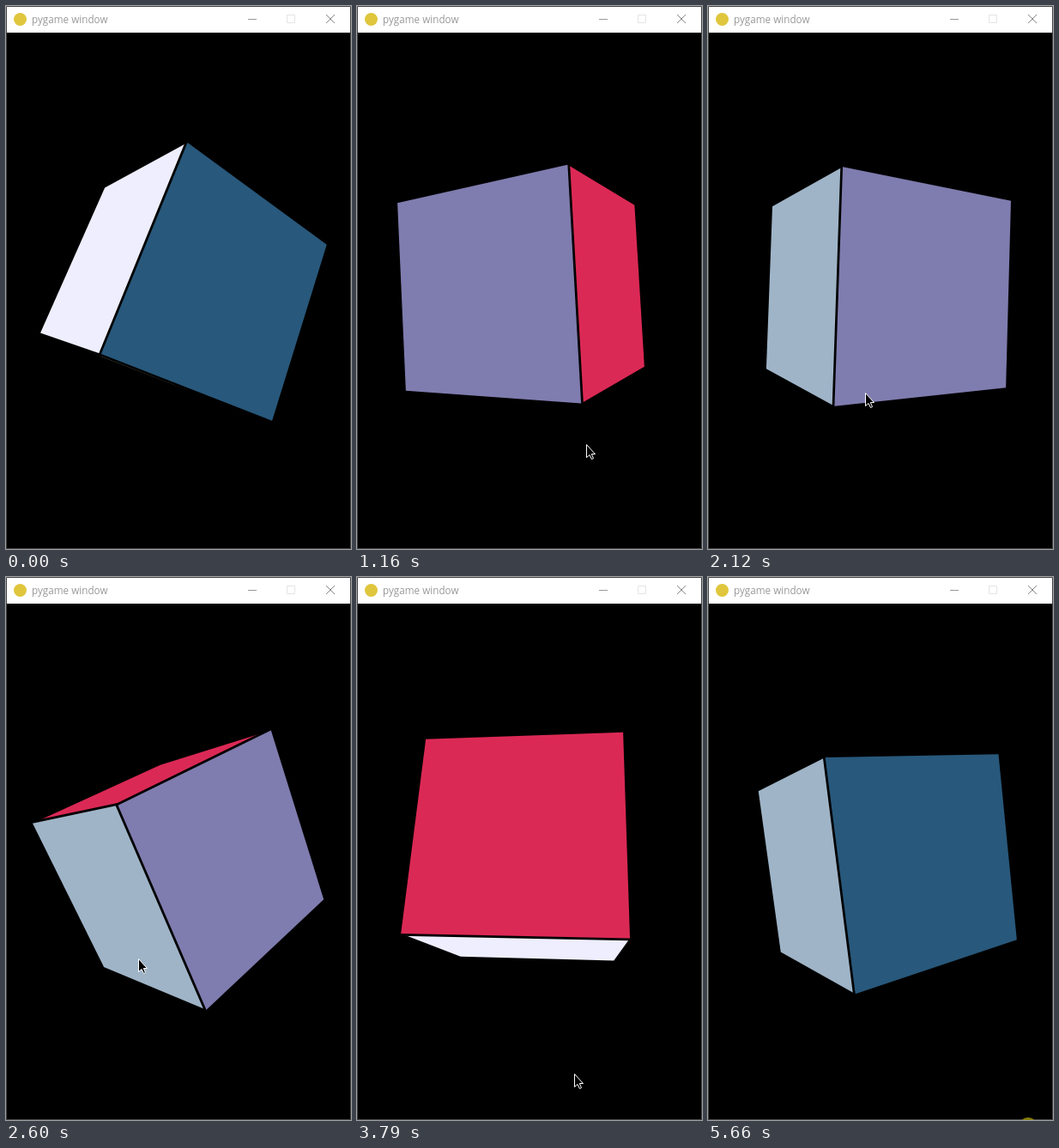
Recreate the animation shown at these times as an HTML page with a canvas. Size 402 by 632 pixels, loop 5.83 s.

```html
<!DOCTYPE html>
<html lang="en">
<head>
<meta charset="utf-8">
<title>pygame window</title>
<style>
  html, body { margin: 0; width: 100%; height: 100%; overflow: hidden; background: #000; }
  canvas { display: block; }
</style>
</head>
<body>
<canvas id="stage" width="402" height="632"></canvas>
<script>
const ctx = document.getElementById('stage').getContext('2d');
const LOOP = 5830;
const STEP = 79.2;
const PHASE = 38;
const CENTER = { x: 201, y: 331 };
const FOCAL = 506;
const DISTANCE = 5;

// Turning points of the mouse: step, x, y. One pixel turns the cube one degree.
const PATH = [
  [0, 156, 599], [4, 225, 569], [9, 295, 512], [16, 260, 474], [22, 221, 434],
  [33, 153, 413], [37, 222, 437], [40, 226, 459], [48, 252, 547], [58, 334, 573],
  [68, 368, 599]
];

// Two opposite faces for each axis: negative side, positive side
const FACE_COLORS = ['#7f7caf', '#28587b', '#db2955', '#9fb798', '#eeeeff', '#9fb4c7'];
const CORNERS = [[-1, -1], [1, -1], [1, 1], [-1, 1]];
const ARROW = [[0, 0], [0, 15], [3.5, 12], [6, 17], [8, 16], [5.8, 11], [10, 11]];

function slope(i, k) {
  const before = PATH[i - 1], after = PATH[i + 1];
  return before && after ? (after[k] - before[k]) / (after[0] - before[0]) : 0;
}

// Smooth curve through the turning points
function mouseAt(step) {
  const i = Math.min(PATH.findLastIndex(p => p[0] <= step), PATH.length - 2);
  const p = PATH[i], q = PATH[i + 1], span = q[0] - p[0];
  const u = Math.min(1, (step - p[0]) / span), v = 1 - u;
  return [1, 2].map(k =>
    v * v * (1 + 2 * u) * p[k] + u * u * (3 - 2 * u) * q[k] +
    span * u * v * (v * slope(i, k) - u * slope(i + 1, k)));
}

function rotate([x, y, z], a, b) {
  const y1 = y * Math.cos(a) - z * Math.sin(a);
  const z1 = y * Math.sin(a) + z * Math.cos(a);
  return [x * Math.cos(b) - z1 * Math.sin(b), y1, x * Math.sin(b) + z1 * Math.cos(b)];
}

function project([x, y, z]) {
  const scale = FOCAL / (DISTANCE + z);
  return [CENTER.x + x * scale, CENTER.y + y * scale];
}

function trace(points) {
  ctx.beginPath();
  points.forEach(([x, y]) => ctx.lineTo(x, y));
  ctx.closePath();
}

function drawCube(mx, my) {
  const a = (mx - 180) * Math.PI / 180, b = (180 - my) * Math.PI / 180;
  const visible = FACE_COLORS.map((color, i) => {
    const axis = i >> 1;
    const normal = [0, 0, 0];
    normal[axis] = i % 2 ? 1 : -1;
    const points = CORNERS.map(([p, q]) => {
      const v = [...normal];
      v[(axis + 1) % 3] = p;
      v[(axis + 2) % 3] = q;
      return project(rotate(v, a, b));
    });
    return { depth: rotate(normal, a, b)[2], points, color };
  }).filter(f => 1 + DISTANCE * f.depth < 0).sort((f, g) => g.depth - f.depth);

  // Each nearer face cuts a black gap into the ones behind it
  ctx.lineWidth = 5.5;
  ctx.lineJoin = 'round';
  ctx.strokeStyle = '#000';
  for (const face of visible) {
    trace(face.points);
    ctx.stroke();
    ctx.fillStyle = face.color;
    ctx.fill();
  }
}

function drawArrow(x, y) {
  ctx.save();
  ctx.translate(Math.round(x) + 0.5, Math.round(y) + 0.5);
  trace(ARROW);
  ctx.fillStyle = '#000';
  ctx.fill();
  ctx.lineJoin = 'miter';
  ctx.lineWidth = 1;
  ctx.strokeStyle = '#fff';
  ctx.stroke();
  ctx.restore();
}

function line(color, x1, y1, x2, y2) {
  ctx.beginPath();
  ctx.moveTo(x1, y1);
  ctx.lineTo(x2, y2);
  ctx.lineWidth = 1;
  ctx.strokeStyle = color;
  ctx.stroke();
}

function disc(x, y, r, color) {
  ctx.beginPath();
  ctx.arc(x, y, r, 0, 2 * Math.PI);
  ctx.fillStyle = color;
  ctx.fill();
}

function drawWindow() {
  ctx.fillStyle = '#fff';
  ctx.fillRect(0, 0, 402, 31);
  disc(16.5, 15.5, 7.5, '#e0c63c');
  ctx.fillStyle = '#999';
  ctx.font = '11.7px "Open Sans", "Noto Sans", sans-serif';
  ctx.fillText('pygame window', 30, 20);
  line('#999', 282, 15.5, 292, 15.5);
  ctx.strokeStyle = '#e4e4e4';
  ctx.strokeRect(327.5, 10.5, 9, 9);
  line('#888', 373, 10, 383, 20);
  line('#888', 383, 10, 373, 20);
  ctx.strokeStyle = '#444';
  ctx.strokeRect(0.5, 0.5, 401, 631);
}

function draw(t) {
  const [mx, my] = mouseAt(Math.floor((t + PHASE) / STEP));
  ctx.fillStyle = '#000';
  ctx.fillRect(0, 0, 402, 632);
  drawCube(mx, my);
  drawWindow();
  if (my < 598) drawArrow(mx + 1, my + 30.5);
  if (t >= 5660) disc(373, 640, 11, '#857c0c');
}

const start = performance.now();
function tick() {
  draw((performance.now() - start) % LOOP);
  requestAnimationFrame(tick);
}
tick();
</script>
</body>
</html>
```
